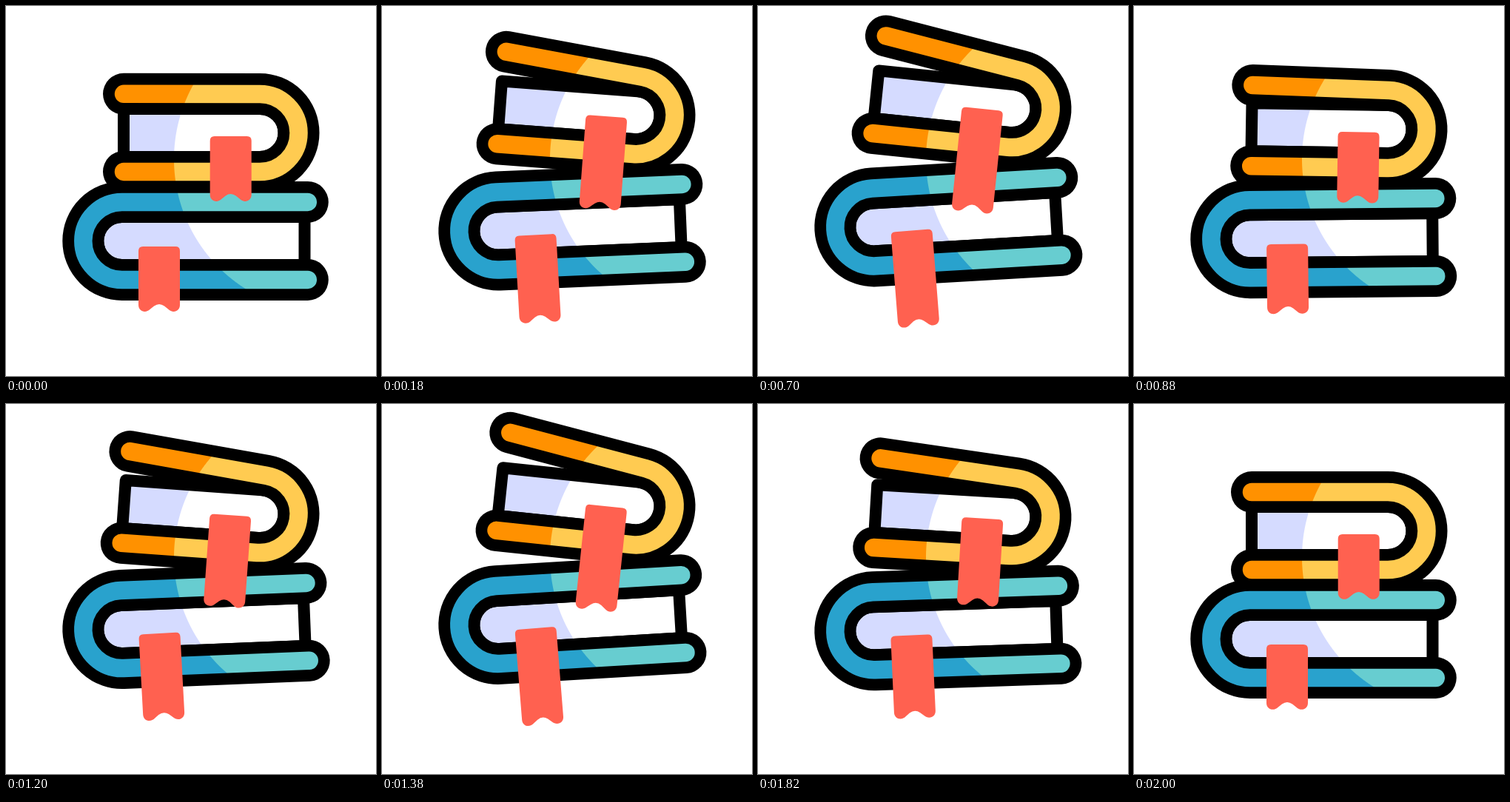
Write an HTML page with a canvas that moves like this. It is 500 px wide and 500 px high and loops after 2.18 s.

```html
<!DOCTYPE html>
<html lang="en">
<head>
<meta charset="utf-8">
<title>Books</title>
<style>
html, body { margin: 0; width: 100%; height: 100%; overflow: hidden; background: #fff; }
canvas { display: block; width: 500px; height: 500px; }
</style>
</head>
<body>
<canvas id="stage"></canvas>
<script>
const LOOP = 2180, RISE = 630, FALL = 325, SECOND = 1030;
const R = 52.5, UP = -Math.PI / 2, DOWN = Math.PI / 2;

const canvas = document.getElementById('stage');
const ctx = canvas.getContext('2d');
const dpr = window.devicePixelRatio || 1;
canvas.width = canvas.height = 500 * dpr;
ctx.scale(dpr, dpr);
ctx.lineCap = ctx.lineJoin = 'round';

// A fixed circle of light splits every surface into two tones.
function tones(light, dark) {
  const g = ctx.createRadialGradient(434, 207, 206.5, 434, 207, 207.5);
  g.addColorStop(0, light);
  g.addColorStop(1, dark);
  return g;
}
const yellow = tones('#ffcb51', '#ff9100');
const teal = tones('#67cdd0', '#29a2cd');
const paper = tones('#ffffff', '#d5dbff');
const red = '#ff6150';

function bezier(x1, y1, x2, y2) {
  const at = (a, b, t) => 3 * (1 - t) * (1 - t) * t * a + 3 * (1 - t) * t * t * b + t * t * t;
  return x => {
    let lo = 0, hi = 1;
    for (let i = 0; i < 24; i++) {
      const mid = (lo + hi) / 2;
      if (at(x1, x2, mid) < x) lo = mid; else hi = mid;
    }
    return at(y1, y2, lo);
  };
}
const easeUp = bezier(0.167, 0.167, 0.15, 1);
const easeDown = x => x * x * (3 - 2 * x);

function lift(ms) {
  const t = ms < SECOND ? ms : ms - SECOND;
  if (t < RISE) return easeUp(t / RISE);
  return t < RISE + FALL ? 1 - easeDown((t - RISE) / FALL) : 0;
}

function place(path, matrix) {
  const out = new Path2D();
  out.addPath(path, matrix);
  return out;
}

function stroke(path, style, width) {
  ctx.strokeStyle = style;
  ctx.lineWidth = width;
  ctx.stroke(path);
}

function coverPath(len, open, extra) {
  const c = Math.cos(open), s = Math.sin(open), p = new Path2D();
  p.moveTo(R * s - (len + extra) * c, -R * c - (len + extra) * s);
  p.lineTo(R * s, -R * c);
  p.arc(0, 0, R, UP + open, DOWN);
  p.lineTo(-len, R);
  return p;
}

function pagePath(spine) {
  const p = new Path2D();
  p.moveTo(-spine, -32.5);
  p.lineTo(0, -32.5);
  p.arc(0, 0, 32.5, UP, DOWN);
  p.lineTo(-spine, 32.5);
  p.closePath();
  return p;
}

// Hangs from the middle of its top edge at 0, 0.
function ribbonPath(len) {
  const p = new Path2D();
  p.moveTo(-28, 6);
  p.quadraticCurveTo(-28, 0, -22, 0);
  p.lineTo(22, 0);
  p.quadraticCurveTo(28, 0, 28, 6);
  p.lineTo(28, len - 9);
  p.bezierCurveTo(28, len - 0.5, 18.5, len + 3, 12, len - 3.5);
  p.lineTo(7, len - 7.5);
  p.quadraticCurveTo(0, len - 12.5, -7, len - 7.5);
  p.lineTo(-12, len - 3.5);
  p.bezierCurveTo(-18.5, len + 3, -28, len - 0.5, -28, len - 9);
  p.closePath();
  return p;
}

function book(o) {
  const m = new DOMMatrix().translate(o.x, o.y).rotate(o.turn).scale(o.side, 1);
  const page = place(pagePath(o.spine), m);
  const cover = place(coverPath(o.len, o.open, o.extra), m);
  const { x, y, len, tilt } = o.ribbon;
  ctx.fillStyle = paper;
  ctx.fill(page);
  stroke(page, '#000', 16);
  stroke(cover, '#000', 56);
  stroke(cover, o.color, 24.5);
  ctx.fillStyle = red;
  ctx.fill(place(ribbonPath(len), m.translate(x, y).rotate(tilt)));
}

function draw(now) {
  const p = lift(now % LOOP);
  ctx.fillStyle = '#fff';
  ctx.fillRect(0, 0, 500, 500);
  book({
    x: 156.8, y: 317.5 - 21.2 * p, turn: -3.8 * p, side: -1,
    len: 251, spine: 246.7, open: 0, extra: 0, color: teal,
    ribbon: { x: -50.2, y: 7.5, len: 88 + 48 * p, tilt: 1.3 * p }
  });
  book({
    x: 343, y: 171.5 - 37.5 * p, turn: 6.7 * p, side: 1,
    len: 184, spine: 184, open: 9.8 * p * Math.PI / 180, extra: 6 * p, color: yellow,
    ribbon: { x: -39.3, y: 4.5, len: 88 + 59.5 * p, tilt: 0 }
  });
}

function tick() {
  draw(performance.now());
  requestAnimationFrame(tick);
}
tick();
</script>
</body>
</html>
```
